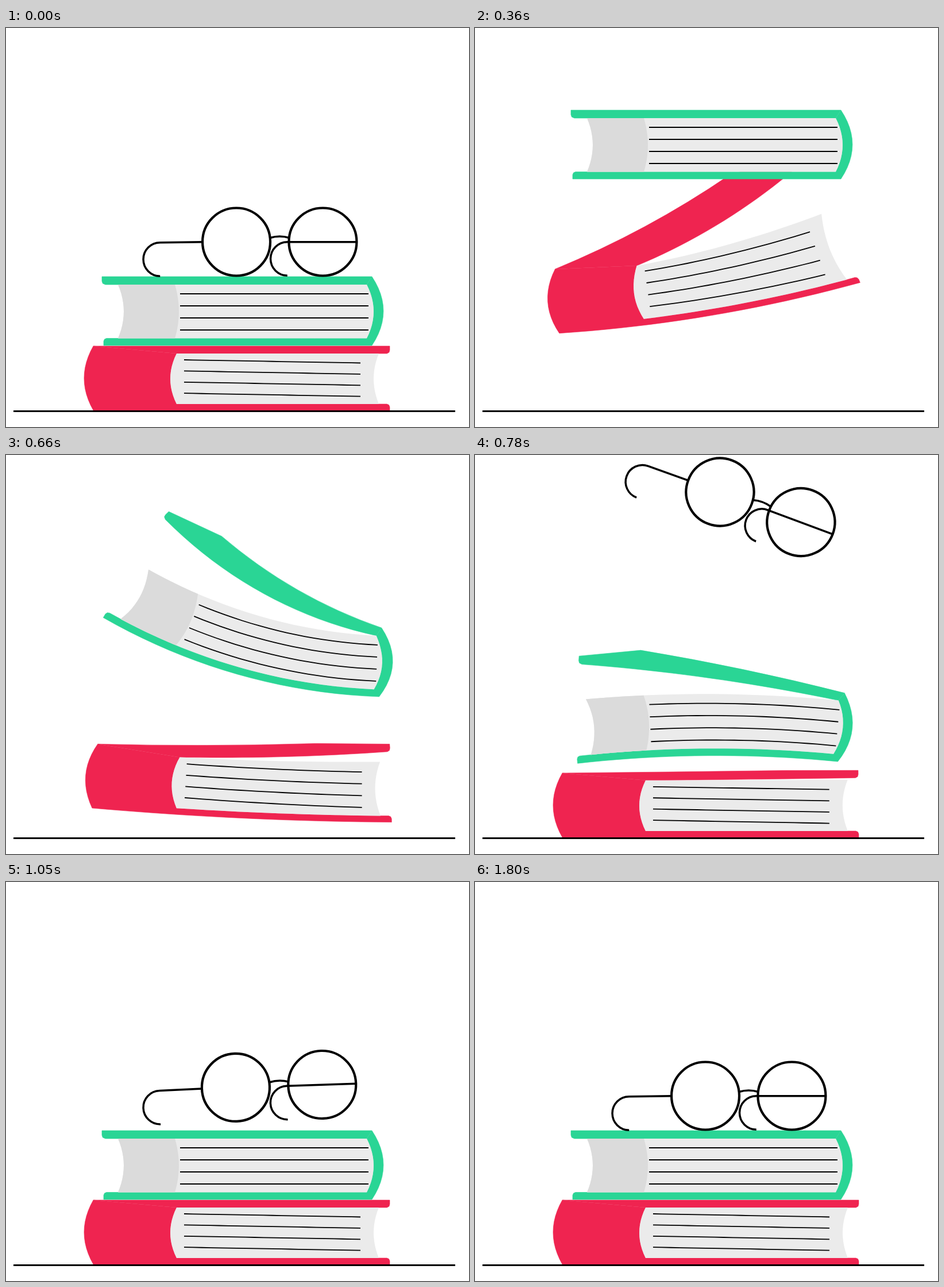
An HTML page with a canvas for the animation above (2460 ms loop, 806 px wide and 695 px high).

```html
<!DOCTYPE html>
<html lang="en">
<head>
<meta charset="utf-8">
<title>Falling books</title>
<style>
  html, body { margin: 0; width: 100%; height: 100%; overflow: hidden; background: #fff; }
  canvas { display: block; width: 806px; height: 695px; }
</style>
</head>
<body>
<canvas id="stage" width="806" height="695"></canvas>
<script>
const ctx = document.getElementById('stage').getContext('2d');
const LOOP = 2460, STEP = 30, RAD = Math.PI / 180;

// Height above rest, tilt and bend of the body, opening of the front cover
const key = (at, height, tilt, bend, open) => ({ at, height, tilt, bend, open });

// Books are measured in s (away from the spine) and v (up from the base).
const red = {
  color: '#ef2450', x: 152, y: 666, dir: 1,
  length: 516, top: 112, low: 11, high: 99, cover: 371, kink: 0.65, fan: 0.02,
  spine: { s: 0, bulge: -16 }, near: { s: 145, bulge: -11 }, far: { s: 497, bulge: -9 },
  lines: { from: 158, to: 465, top: 88, gap: 19.4, slope: -5.5 },
  keys: [
    key(30, 310, 0, 0, 0),
    key(210, 292, 1.9, 0, 3.4),
    key(450, 31, 4.3, 17, 28),
    key(510, 0, 1, 8, 14),
    key(660, 51, -5, 4.6, 3.6),
    key(780, 0, 0, 0, 0.7),
    key(840, 0, 0, 0, 0)
  ]
};
const green = {
  color: '#2ad595', x: 637, y: 553, dir: -1,
  length: 467, top: 120, low: 12.5, high: 106, cover: 461, kink: 0.77, fan: 0.005,
  spine: { s: 0, bulge: -20 }, near: { s: 9, bulge: -12 }, far: { s: 442, bulge: -10 },
  shade: { s: 343, bulge: -7 },
  lines: { from: 334, to: 6, top: 90, gap: 21, slope: 0 },
  keys: [
    key(360, 290, 0, 0, 0),
    key(450, 233, 23.5, -37, 1.2),
    key(660, 132, 2, 28, 12.8),
    key(780, 19, 5.6, -12, 8.5),
    key(825, 0, 0, 0, 2),
    key(900, 0, 0, 0, 0)
  ]
};

// Smooth curve through the keys that never overshoots them
function poseAt(keys, t) {
  const last = keys.length - 1;
  if (t >= keys[last].at) return keys[last];
  const i = keys.findIndex(k => k.at > t) - 1;
  const span = keys[i + 1].at - keys[i].at, u = (t - keys[i].at) / span;
  const value = name => {
    const rate = j => (keys[j + 1][name] - keys[j][name]) / (keys[j + 1].at - keys[j].at);
    const slope = j => {
      if (j === 0 || j === last) return 0;
      const a = rate(j - 1), b = rate(j);
      return a * b > 0 ? 2 * a * b / (a + b) : 0;
    };
    const p = keys[i][name], d = keys[i + 1][name] - p;
    const m = slope(i) * span, n = slope(i + 1) * span;
    return p + u * (m + u * (3 * d - 2 * m - n + u * (m + n - 2 * d)));
  };
  return Object.fromEntries(Object.keys(keys[i]).map(name => [name, value(name)]));
}

const sample = (n, fn) => Array.from({ length: n + 1 }, (_, i) => fn(i / n));
const run = (s0, s1, v0, v1 = v0) =>
  sample(20, u => [s0 + (s1 - s0) * u, v0 + (v1 - v0) * u]);
const bow = ({ s, bulge }, v0, v1) =>
  sample(12, u => [s + bulge * 4 * u * (1 - u), v0 + (v1 - v0) * u]);

function trace(points) {
  points.forEach(([x, y], i) => i ? ctx.lineTo(x, y) : ctx.moveTo(x, y));
}

function fillShape(points, color) {
  ctx.fillStyle = color;
  ctx.beginPath();
  trace(points);
  ctx.fill();
}

function drawBook(book, t) {
  const { dir, length, top, low, high, near, far, color, lines } = book;
  const { height, tilt, bend, open } = poseAt(book.keys, t);
  const spine = [book.x - dir * bend * 0.45, book.y - height];
  const stretch = 1 + bend * 0.0025, fan = open * book.fan;

  const along = ([x, y], angle, d) =>
    [x + dir * d * Math.cos(angle * RAD), y - d * Math.sin(angle * RAD)];
  const offset = (point, angle, d) => along(point, angle + 90, d);
  const place = ([s, v]) => {
    const u = Math.max(0, s / length);
    const base = along(spine, tilt + bend * u / 2, s * stretch);
    const lift = Math.max(0, v - low) * fan * u ** 1.5;
    return offset(base, tilt + bend * u + fan * 16 * u * u, v + lift);
  };

  // front cover: follows the body, plus its own opening and curl
  const hinge = near.s / length, thick = top - high;
  const angle = tilt + bend * hinge + open * 0.75;
  const curl = bend * (1 - hinge) + open * 0.5;
  const reach = book.cover * (stretch - curl * 0.004 - open * 0.001);
  const root = place([near.s, high]), corner = place([0, top]);
  const inner = q => along(root, angle + curl * q / 2, reach * q);
  const over = (q, d) => offset(inner(q), angle + curl * q, d);
  const kink = over(book.kink, thick + open * 2.3);
  const dx = kink[0] - corner[0], dy = kink[1] - corner[1], sag = dir * curl * 0.0028;
  ctx.fillStyle = ctx.strokeStyle = color;
  ctx.lineWidth = 0.6;
  ctx.beginPath();
  trace([...sample(20, u => inner(u * 0.987)), over(0.997, 2), over(1, 6), over(1, thick), kink]);
  ctx.quadraticCurveTo(
    corner[0] + dx / 2 - dy * sag, corner[1] + dy / 2 + dx * sag, ...corner);
  ctx.closePath();
  ctx.fill();
  ctx.stroke();

  // spine and back cover
  fillShape([
    ...bow(book.spine, top, 0), ...run(0, length, 0),
    [length, low - 5], [length - 1.5, low - 1.5], [length - 5, low],
    ...run(length - 5, near.s, low), ...bow(near, low, high)
  ].map(place), color);
  ctx.stroke();

  // pages
  const block = from => [
    ...bow(from, low, high), ...run(from.s, far.s, high),
    ...bow(far, high, low), ...run(far.s, from.s, low)
  ].map(place);
  fillShape(block(near), '#ebebeb');
  if (book.shade) fillShape(block(book.shade), '#dbdbdb');

  ctx.strokeStyle = '#000';
  ctx.lineWidth = 1.8;
  ctx.beginPath();
  for (let i = 0; i < 4; i++) {
    const v = lines.top - i * lines.gap;
    trace(run(lines.from, lines.to, v, v + lines.slope).map(place));
  }
  ctx.stroke();
}

const glasses = { start: 690, drop: 720, land: 1058, rest: 1230 };

// Speeding fall that turns level, then one small hop
function glassesAt(t) {
  const u = Math.max(0, (t - glasses.drop) / (glasses.land - glasses.drop));
  if (u < 1) return [497.7 - 23.7 * u * u, 87 + 285 * u ** 2.5, 21.2 - 24.2 * u * u];
  const p = Math.min(1, (t - glasses.land) / (glasses.rest - glasses.land));
  return [474 + 2.25 * p, 372.5 - 88 * p * (1 - p), -3 * (1 - p)];
}

function drawGlasses(t) {
  const [x, y, angle] = glassesAt(t);
  ctx.save();
  ctx.translate(x, y);
  ctx.rotate(angle * RAD);
  ctx.strokeStyle = '#000';
  ctx.lineWidth = 4.2;
  for (const side of [-1, 1]) {
    ctx.beginPath();
    ctx.arc(side * 75.2, 0, 59, 0, 2 * Math.PI);
    ctx.stroke();
  }
  ctx.lineWidth = 3.5;
  ctx.beginPath();
  ctx.moveTo(-16.5, -7);
  ctx.quadraticCurveTo(0, -12, 17, -7);
  arm(-134, -208, 1.3);
  arm(134, 13.5, 0.3);
  ctx.stroke();
  ctx.restore();
}

function arm(from, to, y) {
  const r = 29.2;
  ctx.moveTo(from, 0.3);
  ctx.lineTo(to, y);
  ctx.arc(to, y + r, r, -Math.PI / 2, Math.PI / 2, true);
}

function draw(time) {
  let t = Math.floor(time % LOOP / STEP) * STEP;
  if (t < STEP) t = LOOP;   // the loop opens on the settled pile
  ctx.fillStyle = '#fff';
  ctx.fillRect(0, 0, 806, 695);
  for (const book of [red, green]) if (t >= book.keys[0].at) drawBook(book, t);
  if (t >= glasses.start) drawGlasses(t);
  ctx.fillStyle = '#000';
  ctx.fillRect(13, 666, 769, 3);
}

const start = performance.now();
function tick() {
  draw(performance.now() - start);
  requestAnimationFrame(tick);
}
tick();
</script>
</body>
</html>
```
